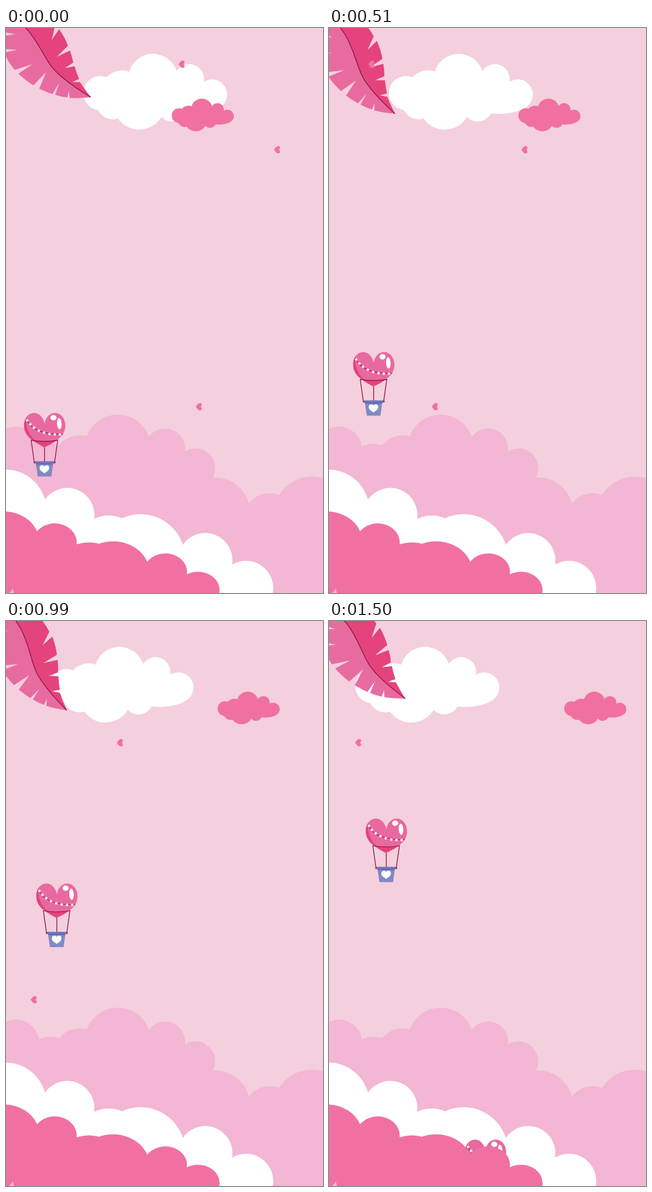
Write an HTML page that moves like this. It is 561 px wide and 998 px high and loops after 1.53 s.

```html
<!DOCTYPE html>
<html lang="en">
<head>
<meta charset="utf-8">
<title>Balloons over pink clouds</title>
<style>
html, body { margin: 0; width: 100%; height: 100%; overflow: hidden; background: #f4cfdd; }
svg { display: block; width: 100vw; height: 100vh; }
</style>
</head>
<body>
<svg viewBox="0 0 561 998" preserveAspectRatio="none">
  <defs>
    <path id="cloud" d="M163 145A30.2 30.2 0 1 1 178 87A37 37 0 0 1 218 77A44 44 0 0 1 302 76A26.3 26.3 0 0 1 350 95A26.5 26.5 0 0 1 379 140C362 151 338 153 317 151A26 26 0 0 1 275 157A46 46 0 0 1 198 160A29 29 0 0 1 163 145Z"/>
    <path id="mini" fill="#f071a1" d="M-6 0C-3 -3 -2 -6 1.5 -6.5C5 -7 6.5 -3 3 0C6.5 3 5 7 1.5 6.5C-2 6 -3 3 -6 0Z"/>
    <path id="heart" d="M68.5 699C66 687 58 680 50 680C39 680 32 690 32 702C32 722 50 731 68.5 741C87 731 105 722 105 702C105 690 97 680 87 680C78 680 70 687 68.5 699Z"/>
    <clipPath id="inHeart"><use href="#heart"/></clipPath>
    <g id="balloon">
      <path d="M44.5 728L50 767M91.5 728L86 767M68.3 740V767" fill="none" stroke="#8e1c3c" stroke-width="1.4"/>
      <use href="#heart" fill="#e8699f"/>
      <g clip-path="url(#inHeart)">
        <path fill="#e5437d" d="M30 684H36C34 704 40 718 52 729H30Z"/>
        <path fill="#e5437d" d="M42 728Q68 733 94 728L84 734L68 739L68 745L40 735Z"/>
      </g>
      <path d="M36 690Q45 718 101 717.5" fill="none" stroke="#8e1c4c" stroke-width="1.2"/>
      <g id="beads" fill="#fbe4ee"></g>
      <ellipse cx="84" cy="688.3" rx="5.4" ry="4.8" fill="#fff"/>
      <ellipse cx="94.3" cy="699" rx="4" ry="10" fill="#fff" transform="rotate(-3 94 699)"/>
      <path d="M44 728Q68 732.5 92 728" fill="none" stroke="#8e1c3c" stroke-width="1.4"/>
      <path d="M52.5 768H83.5L80.3 792.3H56.2Z" fill="#8189c5"/>
      <path d="M51.3 765.3H85.5V769.5H51.3Z" fill="#6f78bb"/>
      <path d="M53 770H83.5" stroke="#4c4f93" stroke-width="1"/>
      <path d="M49 766h2.6v2.8H49ZM85 766h2.6v2.8H85Z" fill="#a32345"/>
      <path fill="#fff" d="M68 774.5C66 771 59.5 771 59.5 777C59.5 781.5 64 784 68 786.5C72 784 76.5 781.5 76.5 777C76.5 771 70 771 68 774.5Z"/>
    </g>
  </defs>

  <rect width="561" height="998" fill="#f4cfdd"/>
  <use id="white" href="#cloud" fill="#fff"/>
  <use id="pink" href="#cloud" fill="#f071a1"/>

  <g id="leaf">
    <path fill="#e86ba0" d="M150 122.3Q130 124.5 113 123.4L111 111L108.5 122.8Q97 121.3 87 118L94 97L82.2 116.8Q70 112.5 58.8 107.2L71 78L48.6 101.3Q34 92.5 21.8 80.5L47 64L15.5 74Q7 64 0 51L-6 44L20 38.5L-4 37L-6 14L16 11L-6 7L-10 -40H0L14 -20L36 1C58 25 66 50 82 70C97 88 120 104 150 122.3Z"/>
    <path fill="#e5437d" d="M150 122.3Q139 108 131 95.5L117 95.5L129.5 90Q125 80 121.3 67.5L104 71L119 61Q117 50 113 39.7L90 51L109.7 31.3Q104 16 94 2L81 21L87 -5Q77 -17 64 -26L50 -45H-5L14 -20L36 1C58 25 66 50 82 70C97 88 120 104 150 122.3Z"/>
    <path fill="none" stroke="#8e1c4c" stroke-width="1.6" d="M14 -20L36 1C58 25 66 50 82 70C97 88 120 104 150 122.3"/>
  </g>

  <path fill="#f3b6d4" d="M0 708A41 41 0 0 1 58 739A47 47 0 0 1 94 737A48 48 0 0 1 143 721A58.5 58.5 0 0 1 253 722A35.3 35.3 0 0 1 316.5 748A35 35 0 0 1 366 794A62.5 62.5 0 0 1 430 840A45 45 0 0 1 483 825A70 70 0 0 1 561 795V998H0Z"/>
  <path fill="#fff" d="M0 780A73 73 0 0 1 69 833A48 48 0 0 1 156 867A57 57 0 0 1 205 866A78.7 78.7 0 0 1 313 913A48 48 0 0 1 400 948A48 48 0 0 1 472 998H0Z"/>
  <use id="second" href="#balloon"/>
  <path fill="#f071a1" d="M0 854A63 54 0 0 1 55 889A38.8 34.1 0 0 1 125 912A60 52 0 0 1 165 911A64 54 0 0 1 250 943A38.2 32.8 0 0 1 320 965A38.3 32.5 0 0 1 377.5 998H0Z"/>
  <path fill="#f3b6d4" d="M5 998Q10 995 12 989Q13 994 14 998Z"/>
  <use id="first" href="#balloon"/>
  <use id="heartA" href="#mini"/>
  <use id="heartB" href="#mini"/>
  <use id="heartC" href="#mini"/>
</svg>
<script>
const LOOP = 1530, STEP = 30;
const $ = id => document.getElementById(id);
const move = (id, x, y, extra = "") =>
  $(id).setAttribute("transform", `translate(${x.toFixed(2)} ${y.toFixed(2)})${extra}`);

const beads = [[37.5, 693], [43, 700], [49.5, 706], [58, 711.3], [67.3, 715], [77, 717.2], [86.3, 718], [95.5, 718]];
for (const [x, y] of beads) {
  const dot = document.createElementNS("http://www.w3.org/2000/svg", "circle");
  dot.setAttribute("cx", x);
  dot.setAttribute("cy", y);
  dot.setAttribute("r", 2.4);
  $("beads").append(dot);
}

// Distance travelled when the speed peaks at v (px/ms) at time p and falls off by k * (t - p)^2.
const glide = (t, v, p, k) => v * t - k / 3 * ((t - p) ** 3 + p ** 3);
const ease = u => (1 - Math.cos(Math.PI * Math.min(Math.max(u, 0), 1))) / 2;

function draw(t) {
  move("white", -0.06 * t, 0);
  move("pink", 234.3 + 0.082 * t, 105.1, " scale(.4315)");

  const swing = 15.5 * ease(t / 800) - 10.3 * ease((t - 800) / 700);
  $("leaf").setAttribute("transform", `rotate(${swing.toFixed(3)} -18 -36)`);

  const rise = glide(t, 0.229, 950, 3.63e-8);
  move("first", rise * 0.1, -rise);
  const left = 1500 - t;
  move("second", 208.5 - 0.02 * left, 236 + 0.2 * left);

  move("heartA", 311 - glide(t, 0.468, 500, 7e-8), 64);
  move("heartB", 480 - glide(t, 0.305, 930, 8.9e-8), 215);
  move("heartC", 341.5 - glide(t, 0.305, 360, 1e-7), 669);
}

let start;
function tick(now) {
  start ??= now;
  draw(Math.floor((now - start) % LOOP / STEP) * STEP);
  requestAnimationFrame(tick);
}
draw(0);
requestAnimationFrame(tick);
</script>
</body>
</html>
```
